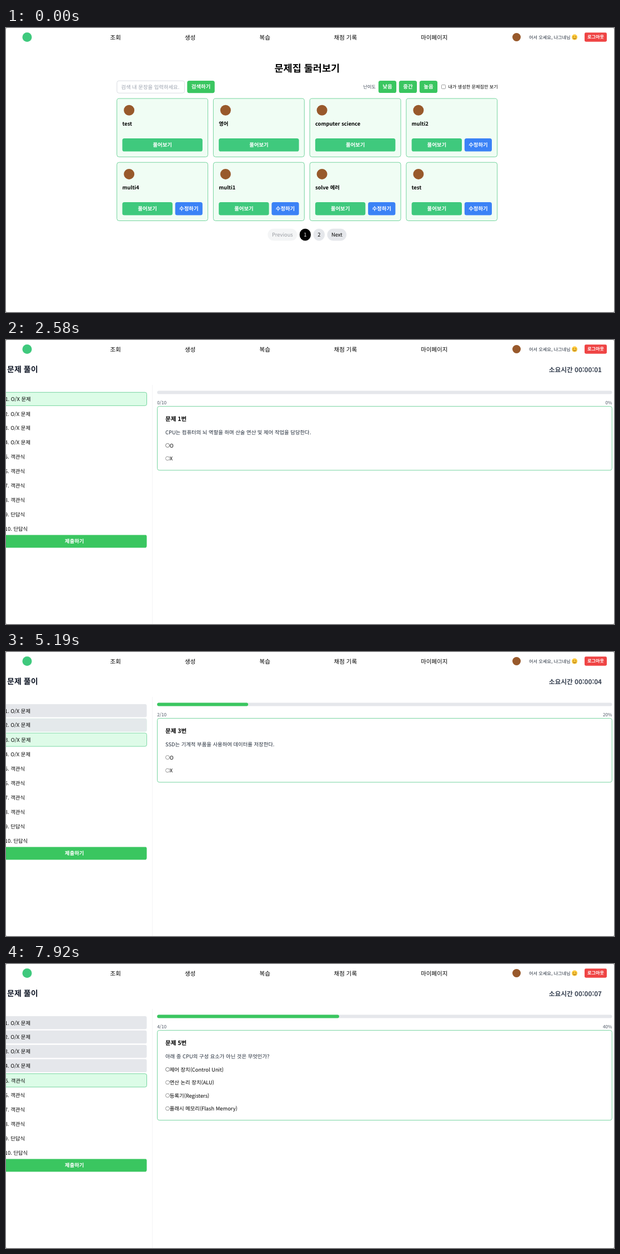
These frames come from a looping animation (1095 px wide and 512 px high, 8000 ms). An HTML page:

```html
<!DOCTYPE html>
<html lang="ko">
<head>
<meta charset="utf-8">
<style>
  html, body { margin: 0; width: 100%; height: 100%; overflow: hidden; background: #fff; }
  svg { display: block; width: 1095px; height: 512px; }
  text {
    font-family: 'Noto Sans CJK KR', 'Noto Sans KR', 'Noto Sans CJK JP', 'Noto Sans CJK', sans-serif;
    text-rendering: geometricPrecision;
    white-space: pre;
  }
</style>
</head>
<body>
<svg id="stage" viewBox="0 0 1095 512"></svg>
<script>
const LOOP = 8000;
const SM = 8.19, MD = 9.36, LG = 10.53, XL = 11.7;
const GREEN = '#3ac660', EMERALD = '#3fc97d', BLUE = '#3b82f6', EDGE = '#68d096', BROWN = '#98592b';
const stage = document.getElementById('stage');

function el(parent, tag, attrs) {
  const node = document.createElementNS('http://www.w3.org/2000/svg', tag);
  set(node, attrs);
  parent.appendChild(node);
  return node;
}
function set(node, attrs) {
  for (const k in attrs) node.setAttribute(k, attrs[k]);
}
function show(node, on) {
  node.setAttribute('visibility', on ? 'inherit' : 'hidden');
}
const group = parent => el(parent, 'g', {});
const circle = (p, cx, cy, r, fill, more) => el(p, 'circle', { cx, cy, r, fill, ...more });

// Rectangle given by its left, top, right and bottom edges.
function box(p, x, y, x2, y2, rx, fill, more) {
  return el(p, 'rect', { x, y, width: x2 - x, height: y2 - y, rx, fill, ...more });
}
// Text placed by the middle of its glyphs.
function label(p, str, x, cy, size, { fill = '#000', weight = 400, anchor = 'start' } = {}) {
  const node = el(p, 'text', {
    x, y: cy + size * 0.36, 'font-size': size, 'font-weight': weight, fill, 'text-anchor': anchor
  });
  node.textContent = str;
  return node;
}
function button(p, str, x, y, x2, y2, fill, size = MD, color = '#fff', weight = 700, rx = 3.6) {
  const face = box(p, x, y, x2, y2, rx, fill);
  label(p, str, (x + x2) / 2, (y + y2) / 2, size, { fill: color, weight, anchor: 'middle' });
  return face;
}

const clamp = v => Math.max(0, Math.min(1, v));
const ease = p => p * p * (3 - 2 * p);
const ramp = (t, start, dur) => ease(clamp((t - start) / dur));
const mix = (a, b, k) => a.map((v, i) => v + (b[i] - v) * k);
const rgb = c => `rgb(${c.map(Math.round)})`;
const passed = (t, times) => times.filter(s => t >= s).length;

// Window and header
box(stage, 0, 0, 1095, 512, 0, '#b5b5b5');
box(stage, 0, 0, 1095, 512, 2.5, '#fff');
circle(stage, 38, 16.5, 8.5, '#3fc97d');
[['조회', 187.5], ['생성', 322], ['복습', 456.5], ['채점 기록', 590.5], ['마이페이지', 747]]
  .forEach(([s, x]) => label(stage, s, x, 17, LG, { weight: 500 }));
circle(stage, 919.5, 16.5, 7.5, BROWN);
label(stage, '어서 오세요, 나그네님', 942, 16.7, SM, { fill: '#1f2937' });
circle(stage, 1024, 16.6, 5, '#fdc83a');
circle(stage, 1022, 15.6, 0.7, '#5b3a12');
circle(stage, 1026, 15.6, 0.7, '#5b3a12');
el(stage, 'path', { d: 'M1021 17.6Q1024 21.4 1027 17.6', fill: 'none', stroke: '#7a4a18', 'stroke-width': 0.9 });
button(stage, '로그아웃', 1042, 8.3, 1082, 24.7, '#ef4444', SM, '#fff', 700, 2.4);

// Browse page
const browse = group(stage);
label(browse, '문제집 둘러보기', 542.3, 72.3, 17.55, { weight: 700, anchor: 'middle' });
box(browse, 199.8, 95.2, 321.6, 117.3, 3.5, '#fff', { stroke: '#d1d5db', 'stroke-width': 0.8 });
label(browse, '검색 내 문장을 입력하세요.', 207.3, 106.2, MD, { fill: '#9ca3af' });
button(browse, '검색하기', 326.3, 95, 375.8, 117.2, GREEN);
label(browse, '난이도', 643.2, 106, SM, { fill: '#374151' });
['낮음', '중간', '높음'].forEach((s, i) =>
  button(browse, s, 670.8 + i * 37, 95, 703 + i * 37, 117, GREEN));
box(browse, 784.4, 102.5, 791.4, 109.5, 1, '#fff', { stroke: '#767676', 'stroke-width': 0.7 });
label(browse, '내가 생성한 문제집만 보기', 796.3, 106, SM);

let picked;
['test', '영어', 'computer science', 'multi2', 'multi4', 'multi1', 'solve 에러', 'test'].forEach((name, i) => {
  const x = 199.7 + (i % 4) * 173.7, y = 127.1 + (i > 3 ? 115.1 : 0);
  box(browse, x, y, x + 163.9, y + 105.3, 4, '#f0fdf4', { stroke: EDGE, 'stroke-width': 0.9 });
  circle(browse, x + 22, y + 21.2, 9.5, BROWN);
  label(browse, name, x + 9.8, y + 45.4, MD, { weight: 700 });
  const face = button(browse, '풀어보기', x + 9.8, y + 71.9, x + (i < 3 ? 154.2 : 100.2), y + 95.4, EMERALD);
  if (i === 2) picked = face;
  if (i > 2) button(browse, '수정하기', x + 105, y + 71.9, x + 154.2, y + 95.4, BLUE);
});
button(browse, 'Previous', 471.3, 361.7, 524.3, 383.5, '#f4f5f6', MD, '#9a9da3', 400, 10.9);
button(browse, '1', 528.8, 361.7, 548.9, 383.5, '#000', MD, '#fff', 400, 10);
button(browse, '2', 553.5, 361.7, 574, 383.5, '#e5e7eb', MD, '#000', 400, 10.2);
button(browse, 'Next', 578.5, 361.7, 613.2, 383.5, '#e5e7eb', MD, '#000', 400, 10.9);

// Solve page
const solve = group(stage);
label(solve, '문제 풀이', 2, 53.3, 14.04, { weight: 700, fill: '#111827' });
const clock = label(solve, '', 1073, 53.3, XL, { weight: 700, fill: '#374151', anchor: 'end' });
box(solve, 263, 81, 263.6, 512, 0, '#ebecee');
const submit = group(solve);
button(submit, '제출하기', -7, 351, 253.5, 374.5, GREEN);
box(solve, 272.2, 91.6, 1091.6, 97.4, 2.9, '#e5e7eb');
const bar = box(solve, 272.2, 91.6, 1091.6, 97.4, 2.9, GREEN);
const count = label(solve, '', 272.2, 113.2, SM, { fill: '#4b5563' });
const percent = label(solve, '', 1091.6, 113.2, SM, { fill: '#4b5563', anchor: 'end' });

const loaded = group(solve);
const ROW_H = 23.5, PITCH = 25.87, RIM = 0.585;
const rows = Array.from({ length: 10 }, (_, i) => ({
  face: box(loaded, -7, 0, 253.5, ROW_H, 3.2, '#fff', { stroke: EDGE, 'stroke-width': 0.9 }),
  text: label(loaded, `${i + 1}. ${i < 4 ? 'O/X 문제' : i < 8 ? '객관식' : '단답식'}`, 0, 0, MD)
}));
const card = box(loaded, 272.5, 119.6, 1091.4, 234.8, 3.6, '#fff', { stroke: EDGE, 'stroke-width': 0.9 });

const OX = ['O', 'X'];
const QUESTIONS = [
  ['CPU는 컴퓨터의 뇌 역할을 하며 산술 연산 및 제어 작업을 담당한다.', OX],
  ['RAM은 전원이 꺼져도 데이터를 계속 저장한다.', OX],
  ['SSD는 기계적 부품을 사용하여 데이터를 저장한다.', OX],
  ['키보드와 마우스는 출력 장치에 해당한다.', OX],
  ['아래 중 CPU의 구성 요소가 아닌 것은 무엇인가?',
    ['제어 장치(Control Unit)', '연산 논리 장치(ALU)', '등록기(Registers)', '플래시 메모리(Flash Memory)']]
];
const sheets = QUESTIONS.map(([ask, options], i) => {
  const g = group(loaded);
  label(g, `문제 ${i + 1}번`, 287, 142, LG, { weight: 700 });
  label(g, ask, 287, 166.8, MD, { fill: '#1f2937' });
  const radios = options.map((s, k) => {
    const cy = 190 + k * 23.5;
    label(g, s, 294.7, cy + 0.2, MD);
    return {
      ring: circle(g, 291, cy, 3.5, '#fff', { 'stroke-width': 0.75 }),
      dot: circle(g, 291, cy, 2.1, BLUE)
    };
  });
  return { g, radios };
});

// Timeline in ms
const ENTER = 1320, LOAD = 1350;
const TICKS = [2220, 3120, 4020, 4920, 5880, 6720, 7590];
const OPENED = [LOAD, 3840, 5070, 6600, 7410];
const ANSWERED = [[2640, 230], [4380, 220], [6150, 200], [6860, 155]];
const ROW_HOVER = [[1, 3640, 4000], [2, 4860, 5250], [3, 6330, 6750], [4, 7390, 7600]];
const RADIO_HOVER = [[1, LOAD, 1920], [0, 2220, 3480], [0, 4380, 4710], [0, 5520, 6270], [0, 6870, 7000], [0, 7860, LOOP]];
const WHITE = [255, 255, 255], PALE = [245, 245, 246], GRAY = [229, 231, 235], MINT = [220, 252, 231];

function drawRows(t, current) {
  let y = 94;
  rows.forEach(({ face, text }, i) => {
    const on = i > 4 ? 0 : i === 0 ? 1 - ramp(t, OPENED[1], 150)
      : ramp(t, OPENED[i], 150) * (1 - (i < 4 ? ramp(t, OPENED[i + 1], 150) : 0));
    const hover = ROW_HOVER.find(h => h[0] === i && t >= h[1] && t < h[2]);
    const done = i < 4 && t >= ANSWERED[i][0];
    const rest = done ? GRAY : hover ? mix(WHITE, PALE, ramp(t, hover[1], 60)) : WHITE;
    const h = ROW_H + 2 * RIM * on;
    set(face, { y: y + 0.3 * on, height: h - 0.6 * on, fill: rgb(mix(rest, MINT, on)), 'stroke-opacity': on });
    set(text, { x: -2.2 + RIM * on, y: y + h / 2 + 0.4 + MD * 0.36 });
    y += h + PITCH - ROW_H;
  });
}

function drawSheet(t, current) {
  sheets.forEach(({ g }, i) => show(g, i === current));
  card.setAttribute('height', current === 4 ? 162 : 115.2);
  const hover = RADIO_HOVER.find(h => t >= h[1] && t < h[2]);
  sheets[current].radios.forEach(({ ring, dot }, k) => {
    const checked = k === 0 && current < 4 && t >= ANSWERED[current][0];
    const over = hover && hover[0] === k;
    show(dot, checked);
    ring.setAttribute('stroke', checked ? BLUE : over ? '#505050' : '#767676');
  });
}

function render(t) {
  const solving = t >= ENTER, ready = t >= LOAD;
  show(browse, !solving);
  show(solve, solving);
  picked.setAttribute('fill', rgb(mix([63, 201, 125], [54, 184, 112], ramp(t, 975, 45))));
  if (!solving) {
    sheets.forEach(s => show(s.g, false));
    sheets.forEach(s => s.radios.forEach(r => show(r.dot, false)));
    return;
  }
  show(loaded, ready);
  submit.setAttribute('transform', ready ? '' : 'translate(0 -259.4)');
  clock.textContent = `소요시간 00:00:0${passed(t, TICKS)}`;

  const done = passed(t, ANSWERED.map(a => a[0]));
  const filled = ready ? ANSWERED.reduce((sum, [s, d]) => sum + ramp(t, s, d) / 10, 0) : 1;
  bar.setAttribute('width', 819.4 * filled);
  count.textContent = ready ? `${done}/10` : '0/0';
  percent.textContent = ready ? `${done * 10}%` : 'NaN%';
  if (!ready) return;
  const current = passed(t, OPENED) - 1;
  drawRows(t, current);
  sheets.forEach(s => s.radios.forEach(r => show(r.dot, false)));
  drawSheet(t, current);
}

const origin = performance.now();
function loop() {
  render((performance.now() - origin) % LOOP);
  requestAnimationFrame(loop);
}
loop();
</script>
</body>
</html>
```
